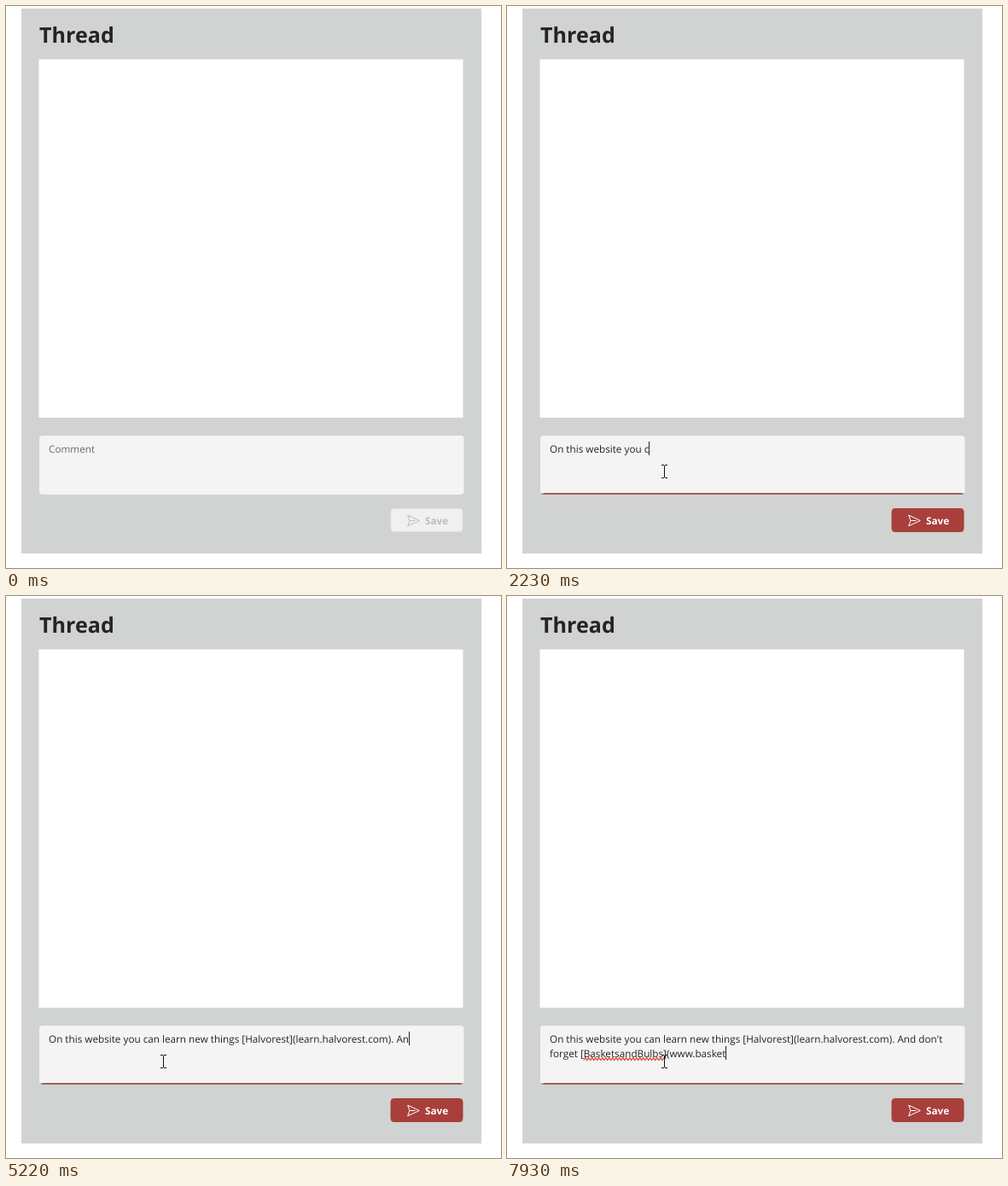
Animation of 580x658 px, one loop 8 s. Source, as an HTML page:

```html
<!DOCTYPE html>
<html lang="en">
<head>
<meta charset="utf-8">
<title>Thread</title>
<style>
  html, body { margin: 0; width: 100%; height: 100%; overflow: hidden; background: #fff; }
  svg { display: block; }
  text {
    font-family: "Open Sans", "Noto Sans", sans-serif;
    font-size: 11.72px;
    white-space: pre;
    text-rendering: geometricPrecision;
    fill: #242424;
  }
  .title { font-size: 25.1px; font-weight: 700; }
  .hint { fill: #6c6c6c; }
  .save rect { fill: #f0f0f0; stroke: #e2e2e2; }
  .save path { fill: none; stroke: #bdbdbd; stroke-linejoin: round; }
  .save text { font-weight: 700; fill: #bdbdbd; }
  .save.on rect { fill: #a83f3a; stroke: #a83f3a; }
  .save.on path { stroke: #fff; }
  .save.on text { fill: #fff; }
</style>
</head>
<body>
<svg width="580" height="658" viewBox="0 0 580 658">
  <rect x="18" y="3" width="539" height="638" fill="#d1d3d2"/>
  <text class="title" x="39" y="43">Thread</text>
  <rect x="38.5" y="62.5" width="497" height="419.5" fill="#fff"/>

  <clipPath id="fieldClip"><rect x="39" y="503" width="497.5" height="69" rx="4"/></clipPath>
  <g clip-path="url(#fieldClip)">
    <rect x="39" y="503" width="498" height="69" fill="#f4f4f4"/>
    <g id="line">
      <rect x="39" y="570.6" width="498" height="1.4" fill="#6d6a6a"/>
      <rect x="43" y="570.2" width="490" height="1.4" fill="#b0504b"/>
    </g>
  </g>
  <text id="hint" class="hint" x="50" y="523">Comment</text>
  <text id="row0" x="50" y="523"></text>
  <text id="row1" x="50" y="540"></text>
  <path id="wave" fill="none" stroke="#e03a36" stroke-width="1.2"/>
  <rect id="caret" width="1" height="16" fill="#242424"/>

  <g id="save" class="save">
    <rect x="451" y="588.5" width="84" height="27" rx="3.5"/>
    <path d="M470.7 596.2L484.3 602.5L470.7 608.8L472.9 602.5ZM473 602.5H479.5"/>
    <text x="491" y="607">Save</text>
  </g>

  <g id="pointer">
    <path id="arrow" d="M0 0V16L3.7 12.5L6.2 18.3L8.6 17.2L6.1 11.6H11.3Z" fill="#fff" stroke="#111"/>
    <path id="beam" d="M-3 -7.5H0M1 -7.5H4M.5 -7V7M-3 7.5H0M1 7.5H4" fill="none" stroke="#111"/>
  </g>
</svg>
<script>
const LOOP = 8000;
const FIRST = "On this website you can learn new things [Halvorest](learn.halvorest.com). And don't ";
const SECOND = "forget [BasketsandBulbs](www.basket";
const WORD = "BasketsandBulbs";

// Typing bursts: [time, characters typed]
const KEYS = [
  [1010, 1], [1580, 10], [1750, 14], [1850, 15], [2590, 27], [2690, 28],
  [2930, 32], [3030, 33], [3480, 42], [3530, 43], [4190, 54], [4330, 57],
  [4430, 58], [5220, 77], [5320, 78], [6110, 92], [6210, 93], [6400, 97],
  [6500, 98], [6970, 105], [7070, 106], [7810, 118], [7910, 119], [7930, 120]
];

const el = id => document.getElementById(id);
const show = (node, on) => node.setAttribute("visibility", on ? "visible" : "hidden");
const clamp = v => Math.max(0, Math.min(1, v));
const [hint, row0, row1, wave, caret, save, line, pointer, arrow, beam] =
  ["hint", "row0", "row1", "wave", "caret", "save", "line", "pointer", "arrow", "beam"].map(el);

function typedAt(t) {
  if (t < KEYS[0][0]) return 0;
  const i = KEYS.findIndex(k => k[0] > t);
  if (i < 0) return KEYS[KEYS.length - 1][1];
  const [t0, n0] = KEYS[i - 1], [t1, n1] = KEYS[i];
  return Math.floor(n0 + (n1 - n0) * (t - t0) / (t1 - t0) + 1e-6);
}

function setText(node, str) {
  if (node.textContent !== str) node.textContent = str;
}

function widthOf(node) {
  return node.textContent ? node.getComputedTextLength() : 0;
}

function drawWave() {
  const at = SECOND.indexOf(WORD);
  const x0 = 50 + row1.getSubStringLength(0, at);
  const x1 = x0 + row1.getSubStringLength(at, WORD.length) + 1;
  let d = `M${x0} 543.5`;
  for (let x = x0 + 2, up = true; x <= x1; x += 2, up = !up) d += `L${x} ${up ? 540.7 : 543.5}`;
  wave.setAttribute("d", d);
}

function drawText(t) {
  const n = typedAt(t);
  const wrapped = n > FIRST.length + 1;
  const all = (FIRST + SECOND).slice(0, n);
  setText(row0, wrapped ? FIRST : all);
  setText(row1, wrapped ? all.slice(FIRST.length) : "");
  show(hint, n === 0);
  save.classList.toggle("on", n > 0);

  const misspelt = n >= 110;
  if (misspelt) drawWave();
  show(wave, misspelt);

  const row = wrapped ? row1 : row0;
  caret.setAttribute("x", Math.round(50 + widthOf(row) - 0.3));
  caret.setAttribute("y", wrapped ? 527 : 510);
  show(caret, t >= 600);
}

function drawPointer(t) {
  const p = clamp((t - 70) / 360);
  const e = 1 - (1 - p) ** 2;
  const x = Math.round(192 - 8 * e), y = Math.round(619 - 74 * e);
  pointer.setAttribute("transform", `translate(${x} ${y})`);
  const seen = t >= 70, inField = y < 572;
  show(arrow, seen && !inField);
  show(beam, seen && inField);
}

function drawFocus(t) {
  const p = clamp((t - 600) / 200);
  const s = 1 - (1 - p) ** 3;
  line.setAttribute("transform", `translate(${288 * (1 - s)} 0) scale(${s} 1)`);
  show(line, p > 0);
}

const start = performance.now();
function frame(now) {
  const t = Math.max(0, now - start) % LOOP;
  drawPointer(t);
  drawFocus(t);
  drawText(t);
  requestAnimationFrame(frame);
}
frame(start);
</script>
</body>
</html>
```
